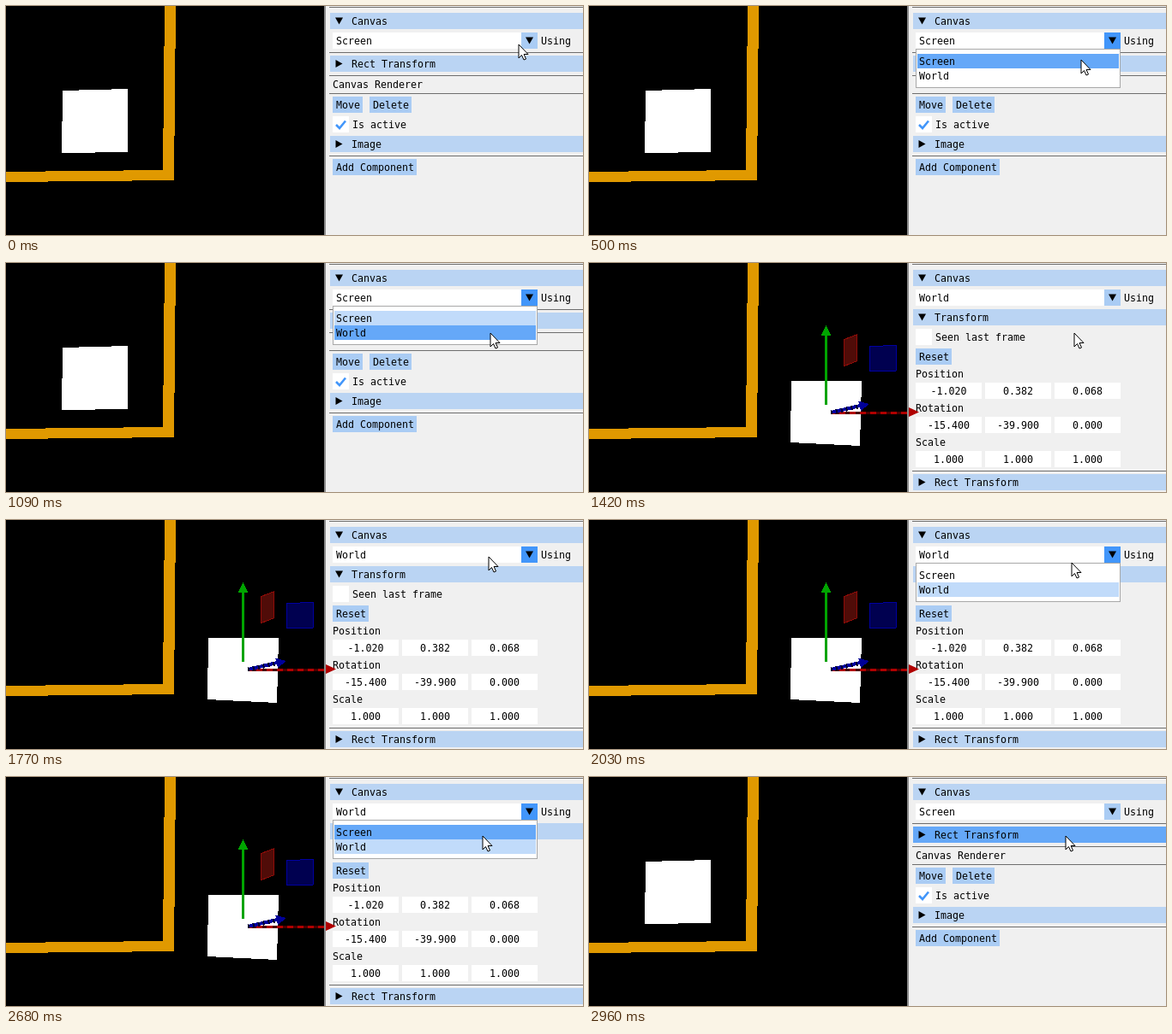
An HTML page that plays this animation: 673x268 px, repeating every 3.01 s.

```html
<!DOCTYPE html>
<html lang="en">
<head>
<meta charset="utf-8">
<style>
  html, body { margin: 0; width: 100%; height: 100%; overflow: hidden; background: #000; }
  svg { display: block; width: 673px; height: 268px; }
  text { font: 11.63px "DejaVu Sans Mono", "Liberation Mono", monospace; fill: #000; white-space: pre; }
</style>
</head>
<body>
<svg id="stage" viewBox="0 0 673 268"></svg>
<script>
const LOOP = 3010, ROW = 19;
const PALE = '#bad4f3', BUTTON = '#aaccf4', HOVER = '#65a8f8', ACTIVE = '#4296fa', PICKED = '#c1dbfa';

const rect = (x, y, w, h, fill, extra = '') =>
  `<rect x="${x}" y="${y}" width="${w}" height="${h}" fill="${fill}" ${extra}/>`;
const poly = (points, fill, extra = '') => `<polygon points="${points}" fill="${fill}" ${extra}/>`;
const line = (x1, y1, x2, y2, color, width, dash = '') =>
  `<line x1="${x1}" y1="${y1}" x2="${x2}" y2="${y2}" stroke="${color}" stroke-width="${width}" stroke-dasharray="${dash}"/>`;
const crisp = (id, s) => `<g id="${id}" shape-rendering="crispEdges">${s}</g>`;

// Widgets are placed by the middle of their text row.
const label = (x, y, s, anchor = 'start') => `<text x="${x}" y="${y + 4}" text-anchor="${anchor}">${s}</text>`;
const box = (x, y, w, fill, id = '') => rect(x, y - 10, w, ROW, fill, id && `id="${id}"`);
const rule = y => rect(377, y, 296, 1, '#6e6e6e');
const arrow = (x, y, open) => open
  ? poly(`${x - 4.5},${y - 4.5} ${x + 4.5},${y - 4.5} ${x},${y + 3.5}`, '#000')
  : poly(`${x - 4},${y - 5} ${x - 4},${y + 4} ${x + 4},${y - 0.5}`, '#000');
const header = (y, s, open, id) => box(378, y, 295, PALE, id) + arrow(388.5, y, open) + label(403, y, s);
const button = (x, y, w, s) => box(x, y, w, BUTTON) + label(x + 4, y, s);
const checkbox = (y, s) => box(381, y, ROW, '#fff') + label(404, y, s);
const fields = (y, name, values) => label(381, y, name) + values.map((v, i) =>
  box(381 + 81 * i, y + 20, 77, '#fff') + label(419.5 + 81 * i, y + 20, v, 'middle')).join('');

const frame = poly('185,0 198,0 196,204 0,206 0,194 183,192', '#e09900');
const screenScene = poly('66,99 142,97 142,171 65,172', '#fff');
const worldScene =
  poly('236,138 318,138 316,214 235,210', '#fff') +
  poly('297.5,89.5 312,84 312,115 297.5,120.5', '#500c08', 'stroke="#900c08"') +
  poly('327.5,97.5 358.5,96.5 358.5,126 327.5,127', '#000050', 'stroke="#0000a0"') +
  line(276.5, 166, 276.5, 82, '#00a400', 3) + poly('276.5,73 270.5,85 282.5,85', '#00a400') +
  line(284, 176, 374, 175, '#b00000', 3) + line(287, 176, 372, 175, '#4a0000', 3, '5 7') +
  line(282, 175, 316, 167, '#0000a0', 4) + line(282, 175, 314, 168, '#000030', 5, '2 4') +
  poly('327,165 314,161.5 317,173', '#000098');
const redTip = poly('373,169 385,174.5 373,180', '#b00000');

const panel = rect(371, 0, 2, 268, '#8c8c8c') + rect(373, 0, 300, 268, '#f0f0f0') + rule(1) +
  header(18, 'Canvas', true) + box(381, 41, 220, '#fff') +
  box(601, 41, ROW, BUTTON, 'comboButton') + arrow(610.5, 41, true) + label(624, 41, 'Using');

const screenPanel = rule(54) + header(68, 'Rect Transform', false, 'rectHeader') + rule(81) +
  label(381, 92, 'Canvas Renderer') + rule(102) +
  button(381, 116, 35, 'Move') + button(424, 116, 49, 'Delete') + checkbox(139, 'Is active') +
  `<polyline points="385,139 389,143 396,134.5" fill="none" stroke="${ACTIVE}" stroke-width="2.6"/>` +
  header(162, 'Image', false) + rule(175) + button(381, 189, 98, 'Add Component');

const worldPanel = header(64, 'Transform', true, 'transformHeader') + checkbox(87, 'Seen last frame') +
  button(381, 110, 42, 'Reset') +
  fields(130, 'Position', ['-1.020', '0.382', '0.068']) +
  fields(170, 'Rotation', ['-15.400', '-39.900', '0.000']) +
  fields(210, 'Scale', ['1.000', '1.000', '1.000']) +
  rule(243) + header(257, 'Rect Transform', false) + redTip;

const popup = rect(381.5, 50.5, 238, 45, '#fff', 'stroke="#a8a8a8"') +
  rect(383, 56, 235, 17, '#fff', 'id="itemScreen"') + rect(383, 73, 235, 17, '#fff', 'id="itemWorld"') +
  label(385, 65, 'Screen') + label(385, 82, 'World');

const pointer = poly('0.5,0.5 0.5,16.5 4,13 6.5,18.5 9,17.5 6.6,12 11.5,12', '#fff', 'stroke="#000"');

document.getElementById('stage').innerHTML = rect(0, 0, 673, 268, '#000') + crisp('frame', frame) +
  crisp('screenScene', screenScene) + crisp('worldScene', worldScene) + panel +
  `<g id="screenPanel">${screenPanel}</g><g id="worldPanel">${worldPanel}</g>` +
  `<text id="choice" x="385" y="45"></text><g id="popup">${popup}</g><g id="pointer">${pointer}</g>`;

const el = id => document.getElementById(id);
const show = (id, on) => el(id).setAttribute('display', on ? 'inline' : 'none');
const fill = (id, color) => el(id).setAttribute('fill', color);

// time, x, y of the pointer tip
const path = [
  [0, 598, 45], [230, 598, 45], [500, 574, 63], [920, 565, 79], [1150, 565, 82], [1420, 566, 82],
  [1780, 563, 43], [1900, 563, 43], [2030, 563, 50], [2350, 557, 67], [2680, 556, 69], [LOOP, 556, 69]
];

function pointerAt(t) {
  const i = path.findIndex(p => p[0] > t);
  const [t0, x0, y0] = path[i - 1], [t1, x1, y1] = path[i];
  const u = (t - t0) / (t1 - t0), k = u * u * (3 - 2 * u);
  return [Math.round(x0 + (x1 - x0) * k), Math.round(y0 + (y1 - y0) * k)];
}

function draw(t) {
  const world = t >= 1200 && t < 2850;
  const open = (t >= 230 && t < 1200) || (t >= 1820 && t < 2850);
  const [x, y] = pointerAt(t);
  const over = (top, height) => y >= top && y < top + height;

  for (const part of ['Scene', 'Panel']) {
    show('screen' + part, !world);
    show('world' + part, world);
  }
  show('popup', open);
  el('choice').textContent = world ? 'World' : 'Screen';
  fill('comboButton', open || (t >= 40 && over(31, ROW)) ? ACTIVE : BUTTON);
  fill('rectHeader', !open && over(58, ROW) ? HOVER : PALE);
  fill('transformHeader', !open && over(54, ROW) ? HOVER : PALE);
  fill('itemScreen', over(56, 17) ? HOVER : world ? '#fff' : PICKED);
  fill('itemWorld', over(73, 17) ? HOVER : world ? PICKED : '#fff');
  el('pointer').setAttribute('transform', `translate(${x - 0.5} ${y - 0.5})`);
}

const start = performance.now();
function tick() {
  draw((performance.now() - start) % LOOP);
  requestAnimationFrame(tick);
}
tick();
</script>
</body>
</html>
```
